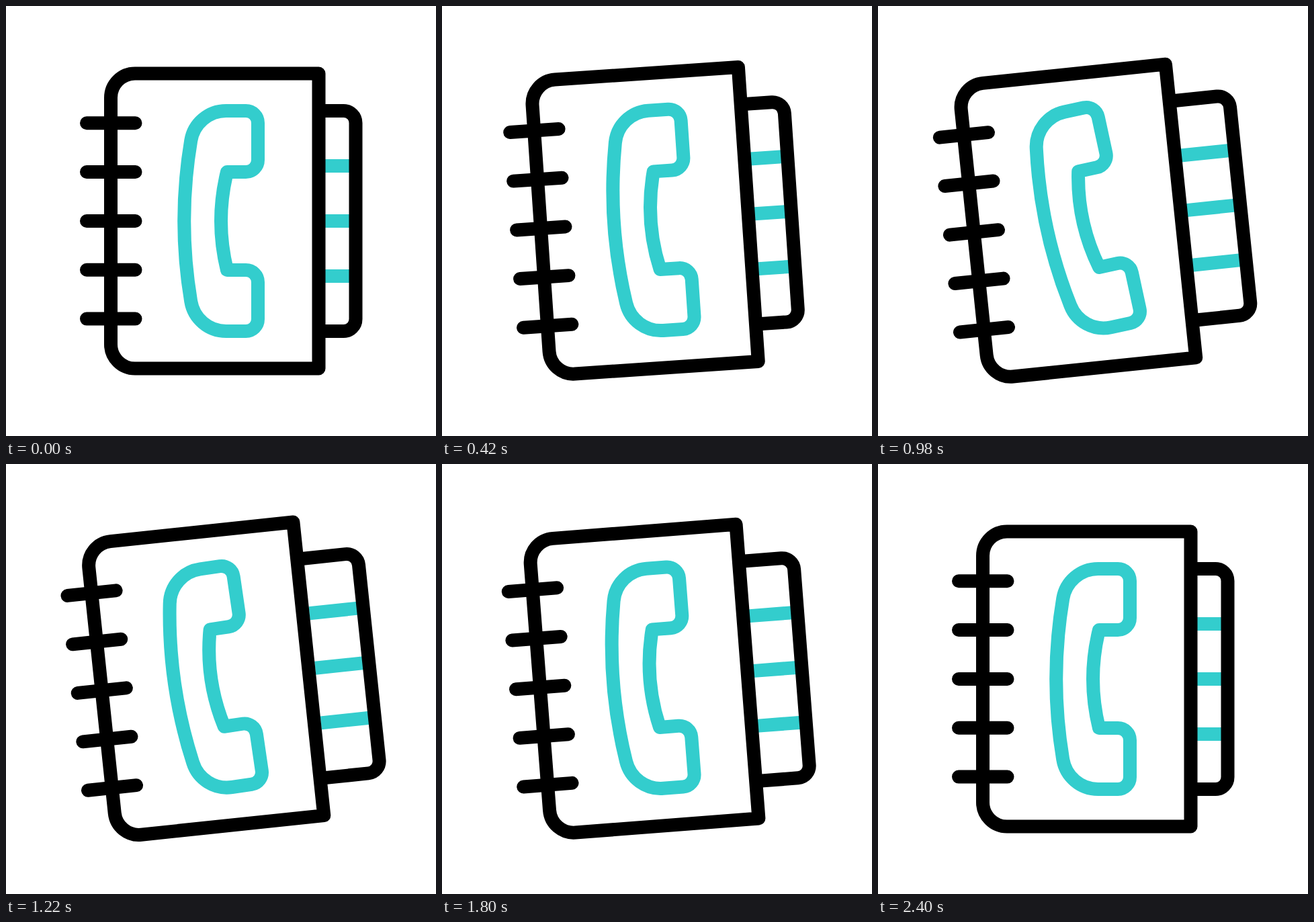
An HTML page that plays this animation: 640 by 640 pixels, repeating every 2720 ms.

```html
<!DOCTYPE html>
<html lang="en">
<head>
<meta charset="utf-8">
<title>Phone book</title>
<style>
  html, body { margin: 0; height: 100%; overflow: hidden; background: #fff; }
  svg { display: block; width: 100%; height: 100%; }
  path { fill: none; stroke: #000; stroke-width: 20; stroke-linejoin: round; }
  .accent { stroke: #33cdcd; }
  .cover { fill: #fff; }
  .rings { stroke-linecap: round; }
</style>
</head>
<body>
<svg viewBox="0 0 640 640">
  <g id="book">
    <g id="tab">
      <path class="accent" d="M440 238H520M440 320H520M440 402H520"/>
      <path d="M430 156H502.500a18 18 0 0 1 18 18V466a18 18 0 0 1-18 18H430"/>
    </g>
    <path class="cover" d="M465.500 100.500H192a36 36 0 0 0-36 36V503.500a36 36 0 0 0 36 36H465.500Z"/>
    <path class="rings" d="M120 174.200H192.500M120 247H192.500M120 320H192.500M120 392.800H192.500M120 465.600H192.500"/>
    <path id="phone" class="accent" d="M327.500 156H357a18 18 0 0 1 18 18V229a18 18 0 0 1-18 18H329Q311 320 329 393H357a18 18 0 0 1 18 18V466a18 18 0 0 1-18 18H327.500A53 53 0 0 1 275.200 439.500Q255.200 320 275.200 200.500A53 53 0 0 1 327.500 156Z"/>
  </g>
</svg>
<script>
  const LOOP = 2720;
  const [book, tab, phone] = ['book', 'tab', 'phone'].map(id => document.getElementById(id));

  // cubic-bezier(1/3, 0, 0, 1)
  function ease(x) {
    if (x <= 0) return 0;
    if (x >= 1) return 1;
    let low = 0, high = 1;
    for (let i = 0; i < 24; i++) {
      const s = (low + high) / 2;
      if ((1 - s) ** 2 * s + s ** 3 < x) low = s; else high = s;
    }
    return low * low * (3 - 2 * low);
  }

  const step = (t, start, duration) => ease((t - start) / duration);
  const swing = (t, start, duration) => {
    const x = Math.min(1, Math.max(0, (t - start) / duration));
    return x * x * (3 - 2 * x);
  };

  function draw(t) {
    const back = step(t, 1652, 800);
    const settled = t >= 2400;
    const tilt = settled ? 0 : 6 * (step(t, 72, 1115) - back);
    const slide = settled ? 0 : 35.5 * (step(t, 216, 1110) - back);
    const ring = 5 * swing(t, 750, 120) - 12 * swing(t, 870, 130) + 7 * step(t, 1000, 680);

    book.setAttribute('transform', `rotate(${-tilt} 313 457)`);
    tab.setAttribute('transform', `translate(${slide})`);
    phone.setAttribute('transform', `rotate(${ring} 314 328)`);
  }

  const begin = performance.now();
  function tick() {
    draw((performance.now() - begin) % LOOP);
    requestAnimationFrame(tick);
  }
  tick();
</script>
</body>
</html>
```
